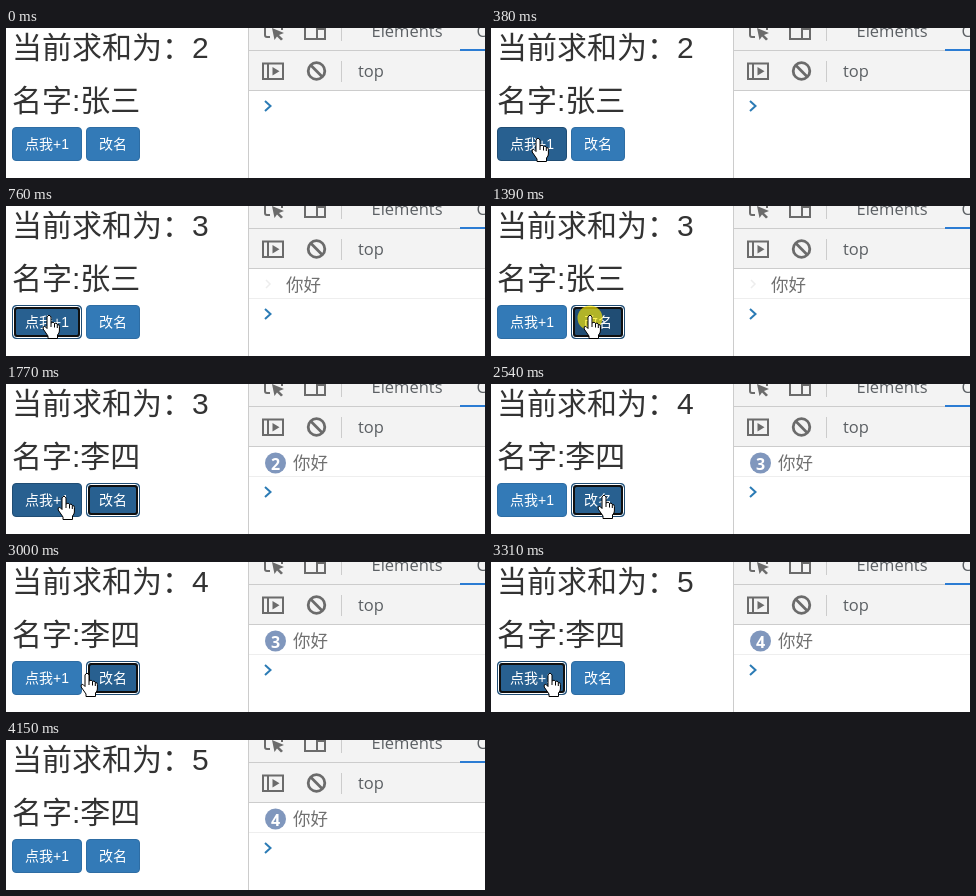
Write an HTML page that moves like this. It is 479x150 px and loops after 4230 ms.

```html
<!DOCTYPE html>
<html lang="zh-CN">
<head>
<meta charset="utf-8">
<title>Counter demo</title>
<style>
html, body { margin: 0; width: 100%; height: 100%; overflow: hidden; background: #fff; }
svg { display: block; }
text { white-space: pre; }
.head { font: 400 30px "Liberation Sans", "Noto Sans CJK SC", "Noto Sans CJK", sans-serif; fill: #333; }
.label { font: 500 14px "Liberation Sans", "Noto Sans CJK SC", "Noto Sans CJK", sans-serif; fill: #fff; }
.tool { font: 400 16.5px "Open Sans", "Noto Sans", sans-serif; fill: #5b5f63; }
.log { font: 300 17.5px "Noto Sans CJK SC", "Noto Sans CJK", sans-serif; fill: #707070; }
.num { font: 700 16px "Open Sans", sans-serif; fill: #fff; text-anchor: middle; }
.icon { fill: none; stroke: #6b6b6b; stroke-width: 2; }
.ring { fill: none; }
</style>
</head>
<body>
<svg width="479" height="150" viewBox="0 0 479 150">
  <text class="head" x="6" y="30">当前求和为：</text>
  <text class="head" x="186" y="30" id="count"></text>
  <text class="head" x="6" y="83" id="name"></text>
  <g id="buttons"></g>

  <rect x="243" width="236" height="62" fill="#f3f3f3"/>
  <path d="M242.5 0V150M243 22.5H479M243 62.5H479M335.5 0V13M335.5 33V54" stroke="#ccc" fill="none"/>
  <path class="icon" d="M259 0V7Q259 9 261 9H264M276 0V2"/>
  <path d="M266 0L278 5L273 7L277 11L275 12.5L271 8.5L268.5 12Z" fill="#6b6b6b"/>
  <path class="icon" d="M299 0V11H311M319 0V2"/>
  <rect class="icon" x="311" y="1" width="8" height="10"/>
  <text class="tool" x="365.5" y="9">Elements</text>
  <text class="tool" x="470.5" y="9">Console</text>
  <rect x="454" y="21" width="25" height="2" fill="#2b7cd3"/>
  <rect class="icon" x="257" y="35.5" width="20" height="15.5"/>
  <path class="icon" d="M262 35V51"/>
  <path d="M266.500 39L273.500 43.300L266.500 47.500Z" fill="#6b6b6b"/>
  <g class="icon" style="stroke-width:2.800">
    <circle cx="310.500" cy="43" r="8.300"/>
    <path d="M304.800 37.300L316.200 48.700"/>
  </g>
  <text class="tool" x="352" y="49">top</text>

  <g id="entry">
    <path d="M243 92.500H479" stroke="#eee"/>
    <path id="faint" d="M260 74L264 78L260 82" fill="none" stroke="#ededed" stroke-width="1.500"/>
    <g id="badge">
      <circle cx="269.500" cy="79" r="10.500" fill="#8097bd"/>
      <text class="num" x="269.500" y="86" id="hits"></text>
    </g>
    <text class="log" y="85" id="msg">你好</text>
  </g>
  <path id="prompt" d="M259 -5L264.500 0L259 5" fill="none" stroke="#2b7bb5" stroke-width="2"/>

  <circle id="press" r="12.500" fill="#ffeb00" fill-opacity=".65"/>
  <g id="cursor" fill="#fff" stroke="#000" stroke-linejoin="round">
    <path id="hand" d="M-2 2Q0 -1.500 2 2V8Q4.500 6 5.500 8.500Q7.500 7 8.300 9.500Q10.400 9 10.400 11.500V16Q10.400 18 8.500 20V23.500H-1V21L-5.800 14Q-6.500 11 -4.200 11.300L-2 13.500ZM2 8V12M5.500 8.500V12.500M8.300 9.500V13"/>
    <path id="arrow" d="M0 0V16L4 12.500L6.500 18.500L9 17.500L6.500 11.500H11.500Z"/>
  </g>
</svg>
<script>
const LOOP = 4230, FRAME = LOOP / 55, LEAD = 12;
const BLUR = 4150, GONE = 3850;
const ENTRY = { x: 156, y: 141 };
const $ = id => document.getElementById(id);

// The pointer travels to each stop, then presses its button
const stops = [
  { leave: 150, arrive: 450, down: 620, up: 760, button: 0, x: 43, y: 109 },
  { leave: 990, arrive: 1160, down: 1390, up: 1470, button: 1, x: 99, y: 109 },
  { leave: 1700, arrive: 1930, down: 1930, up: 2080, button: 0, x: 27, y: 115 },
  { leave: 2160, arrive: 2390, down: 2390, up: 2540, button: 1, x: 113, y: 111 },
  { leave: 2920, arrive: 3160, down: 3160, up: 3310, button: 0, x: 59, y: 111 },
  { leave: 3390, arrive: 3770, x: 443, y: 149 }
];

const show = (el, on) => el.setAttribute("visibility", on ? "inherit" : "hidden");
const set = (el, attrs) => { for (const k in attrs) el.setAttribute(k, attrs[k]); };
const mix = (a, b, k) => a + (b - a) * k;
const ease = k => k * k * (3 - 2 * k);

function shape(parent, tag, attrs) {
  const el = document.createElementNS("http://www.w3.org/2000/svg", tag);
  set(el, attrs);
  return parent.appendChild(el);
}

function button(x, w, label) {
  const box = (inset, rx, attrs) => shape($("buttons"), "rect", {
    x: x + inset, y: 99 + inset, width: w - 2 * inset, height: 34 - 2 * inset, rx, ...attrs
  });
  const face = box(.5, 3.5, {});
  const rings = [
    box(1.5, 3.5, { class: "ring", stroke: "#fff" }),
    box(3, 2.5, { class: "ring", stroke: "#101010", "stroke-width": 2 })
  ];
  shape($("buttons"), "text", { class: "label", x: x + 13, y: 121 }).textContent = label;
  return { x, w, face, rings };
}
const buttons = [button(6, 70, "点我+1"), button(80, 54, "改名")];

function paint(b, hover, focus, active) {
  const fill = active ? "#204d74" : hover || focus ? "#286090" : "#337ab7";
  const stroke = hover || focus ? "#204d74" : "#2e6da4";
  set(b.face, { fill, stroke });
  b.rings.forEach(r => show(r, focus));
}

function pointer(t) {
  const i = stops.findLastIndex(s => s.leave <= t);
  if (i < 0 || t >= GONE) return null;
  const from = stops[i - 1] || ENTRY, to = stops[i];
  const start = to.leave - FRAME;
  const k = ease(Math.min(1, (t - start) / (to.arrive - start)));
  return { x: mix(from.x, to.x, k), y: mix(from.y, to.y, k) };
}

function drawPage(t, p) {
  const over = p ? buttons.findIndex(b => p.x >= b.x && p.x < b.x + b.w && p.y >= 99 && p.y < 133) : -1;
  const last = stops.findLast(s => s.down <= t);
  const focus = last && t < BLUR ? last.button : -1;
  const held = !!last && t < last.up;
  buttons.forEach((b, i) => paint(b, i === over, i === focus, held && i === over));

  const done = stops.filter(s => s.up <= t);
  const adds = done.filter(s => s.button === 0).length;
  const renamed = done.some(s => s.button === 1);
  $("count").textContent = 2 + adds;
  $("name").textContent = "名字:" + (renamed ? "李四" : "张三");
  drawLog(adds + renamed);
  drawPointer(p, over >= 0, held);
}

// Each changed value logs the same line once more
function drawLog(hits) {
  show($("entry"), hits > 0);
  show($("badge"), hits > 1);
  show($("faint"), hits === 1);
  $("hits").textContent = hits;
  set($("msg"), { x: hits > 1 ? 287 : 280 });
  set($("prompt"), { transform: `translate(0 ${hits ? 108 : 78})` });
}

function drawPointer(p, over, held) {
  show($("cursor"), p);
  show($("press"), p && held);
  if (!p) return;
  set($("press"), { cx: p.x, cy: p.y + 3 });
  set($("cursor"), { transform: `translate(${Math.round(p.x)} ${Math.round(p.y)})` });
  $("hand").style.display = over ? "" : "none";
  $("arrow").style.display = over ? "none" : "";
}

const start = performance.now();
let shown = -1;
function tick() {
  const t = (performance.now() - start) % LOOP;
  const frame = Math.floor((t + LEAD) / FRAME);
  if (frame !== shown) {
    // A frame shows the state reached by its middle
    const now = (frame + .3) * FRAME;
    drawPage(now, pointer(now));
    shown = frame;
  }
  requestAnimationFrame(tick);
}
tick();
</script>
</body>
</html>
```
